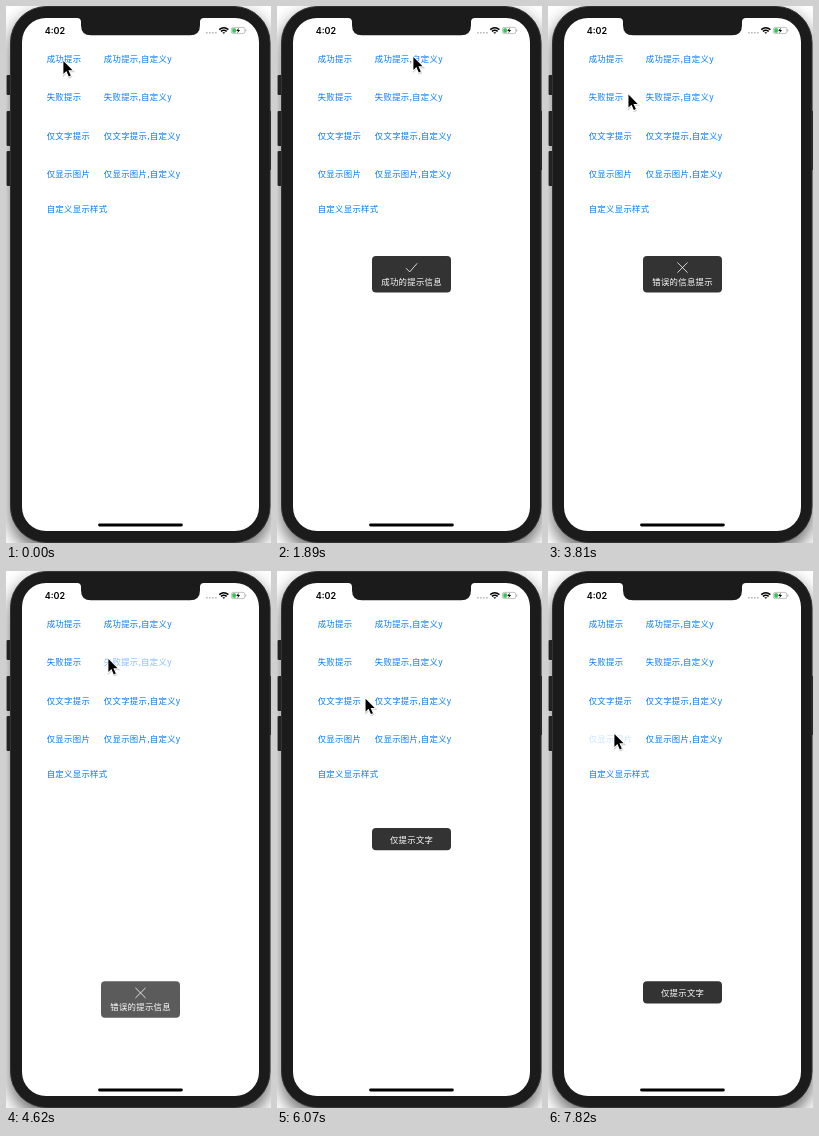
An HTML page for the animation above (7.99 s loop, 265 px wide and 537 px high).

```html
<!DOCTYPE html>
<html lang="zh">
<head>
<meta charset="utf-8">
<title>HUD demo</title>
<style>
  html, body { margin: 0; width: 100%; height: 100%; overflow: hidden; background: #fff; }
  svg { display: block; width: 265px; height: 537px; }
  text { font: 8.4px "Noto Sans CJK SC", "Noto Sans CJK", sans-serif; letter-spacing: .3px; }
  #links { fill: #007aff; }
  #clock { font: 600 9px Inter, sans-serif; letter-spacing: 0; }
  #hud text { fill: #fff; text-anchor: middle; }
  #hud path { fill: none; stroke: #fff; stroke-width: .8; }
  #shadow { filter: blur(9px); }
</style>
</head>
<body>
<svg viewBox="0 0 265 537">
  <rect width="265" height="537" fill="#fff"/>

  <!-- phone -->
  <rect id="shadow" x="4" y="8" width="260.5" height="537" rx="36" opacity=".6"/>
  <g fill="#222">
    <rect x=".6" y="69" width="5" height="20" rx="1"/>
    <rect x=".6" y="105" width="5" height="35" rx="1"/>
    <rect x=".6" y="145" width="5" height="35" rx="1"/>
    <rect x="262" y="105" width="3" height="59"/>
  </g>
  <rect x="4.5" y=".5" width="259.5" height="536" rx="36" fill="#1b1b1b" stroke="#333"/>
  <rect x="16" y="12" width="237" height="513" rx="24" fill="#fff"/>
  <path d="M71 11.5v.5q4 0 4 4v3.2q0 10 10 10h99q10 0 10-10v-3.2q0-4 4-4v-.5z" fill="#1b1b1b"/>
  <rect x="92.1" y="517.5" width="84.7" height="2.9" rx="1.45"/>

  <!-- status bar -->
  <text id="clock" x="38.7" y="27.6">4:02</text>
  <path d="M200 26.7h11" stroke="#bbb" stroke-width="1.6" stroke-dasharray="1.7 1.3"/>
  <g fill="none" stroke="#000" stroke-width="1.5">
    <path d="M213.2 23.6q4.6-3.6 9.2 0M214.9 25.4q2.9-2.2 5.8 0"/>
    <path d="M216.8 26.6h2l-1 1z" fill="#000" stroke-width=".5"/>
  </g>
  <rect x="225.4" y="21.4" width="13.4" height="6.2" rx="1.8" fill="#fff" stroke="#aaa" stroke-width=".7"/>
  <rect x="226.3" y="22.3" width="3.6" height="4.4" rx="1" fill="#34c759"/>
  <path d="M239.8 23.5v2" stroke="#aaa"/>
  <path d="M232.8 21.8l-2.6 3.1h1.8l-.6 2.4 2.7-3.2h-1.8z"/>

  <g id="links"></g>
  <g id="hud">
    <rect x="95" width="79" rx="4" fill="#333"/>
    <path/>
    <text x="134.6"></text>
  </g>
  <g id="cursor">
    <path d="M1.4 2v13l3-2.9 2.4 5.3 2-.9-2.4-5.2h4.2z" transform="translate(.4 1)" stroke="#000" stroke-width="1.8" opacity=".2"/>
    <path d="M1.4 2v13l3-2.9 2.4 5.3 2-.9-2.4-5.2h4.2z" stroke="#fff" stroke-width="1.8" stroke-linejoin="round" paint-order="stroke"/>
  </g>
</svg>
<script>
const LOOP = 7990;
const $ = id => document.getElementById(id);
const clamp = v => Math.min(1, Math.max(0, v));
const smooth = v => (v = clamp(v), v * v * (3 - 2 * v));

// label, baseline, press and release of the left and right link
const rows = [
  ['成功提示', 56, [1040, 1370], [2420, 2630]],
  ['失败提示', 93.5, [3400, 3520], [4360, 4510]],
  ['仅文字提示', 133, [5500, 5650], [6680, 6850]],
  ['仅显示图片', 171, [7820, Infinity]],
  ['自定义显示样式', 205.6],
];

const CHECK = 'M129 12.2l3.7 3.7 7.5-8.6';
const CROSS = 'M129.4 6.5l10.2 10.2m0-10.2l-10.2 10.2';
// start, top, height, icon, message
const huds = [
  [1370, 250, 36.4, CHECK, '成功的提示信息'],
  [2630, 410.3, 36.4, CHECK, '成功的提示信息'],
  [3520, 250, 36.4, CROSS, '错误的信息提示'],
  [4510, 410.3, 36.4, CROSS, '错误的提示信息'],
  [5650, 257, 22.3, '', '仅提示文字'],
  [6850, 410.3, 22.3, '', '仅提示文字'],
];

// start, duration, x, y
const moves = [
  [600, 1, 56, 52], [870, 1, 56, 51], [1480, 410, 135, 49],
  [2790, 430, 62, 87], [3580, 520, 103, 86], [4220, 1, 101, 86],
  [4690, 600, 64, 123], [5830, 520, 116, 129], [6560, 1, 116, 127],
  [6980, 510, 65, 161],
];

const links = [];
function addLink(x, y, label, press) {
  const el = document.createElementNS('http://www.w3.org/2000/svg', 'text');
  el.setAttribute('x', x);
  el.setAttribute('y', y);
  el.textContent = label;
  $('links').append(el);
  if (press) links.push([el, ...press]);
}
rows.forEach(([label, y, left, right], i) => {
  addLink(40.7, y, label, left);
  if (i < 4) addLink(97.8, y, label + ',自定义y', right);
});

const [box, icon, message] = $('hud').children;

function draw(t) {
  for (const [el, down, up] of links)
    el.setAttribute('opacity', t < down ? 1 : .2 + .8 * clamp((t - up) / 300));

  const hud = huds.filter(h => t >= h[0]).pop();
  $('hud').setAttribute('opacity', hud ? smooth((t - hud[0] + 10) / 170) : 0);
  if (hud) {
    const [, top, height, shape, words] = hud;
    $('hud').setAttribute('transform', `translate(0 ${top})`);
    box.setAttribute('height', height);
    icon.setAttribute('d', shape);
    message.setAttribute('y', shape ? 28.8 : 14.6);
    message.textContent = words;
  }

  let x = 56, y = 53;
  for (const [start, span, toX, toY] of moves) {
    const k = smooth((t - start) / span);
    x += (toX - x) * k;
    y += (toY - y) * k;
  }
  $('cursor').setAttribute('transform', `translate(${x} ${y})`);
}

function tick() {
  draw(performance.now() % LOOP);
  requestAnimationFrame(tick);
}
tick();
</script>
</body>
</html>
```
